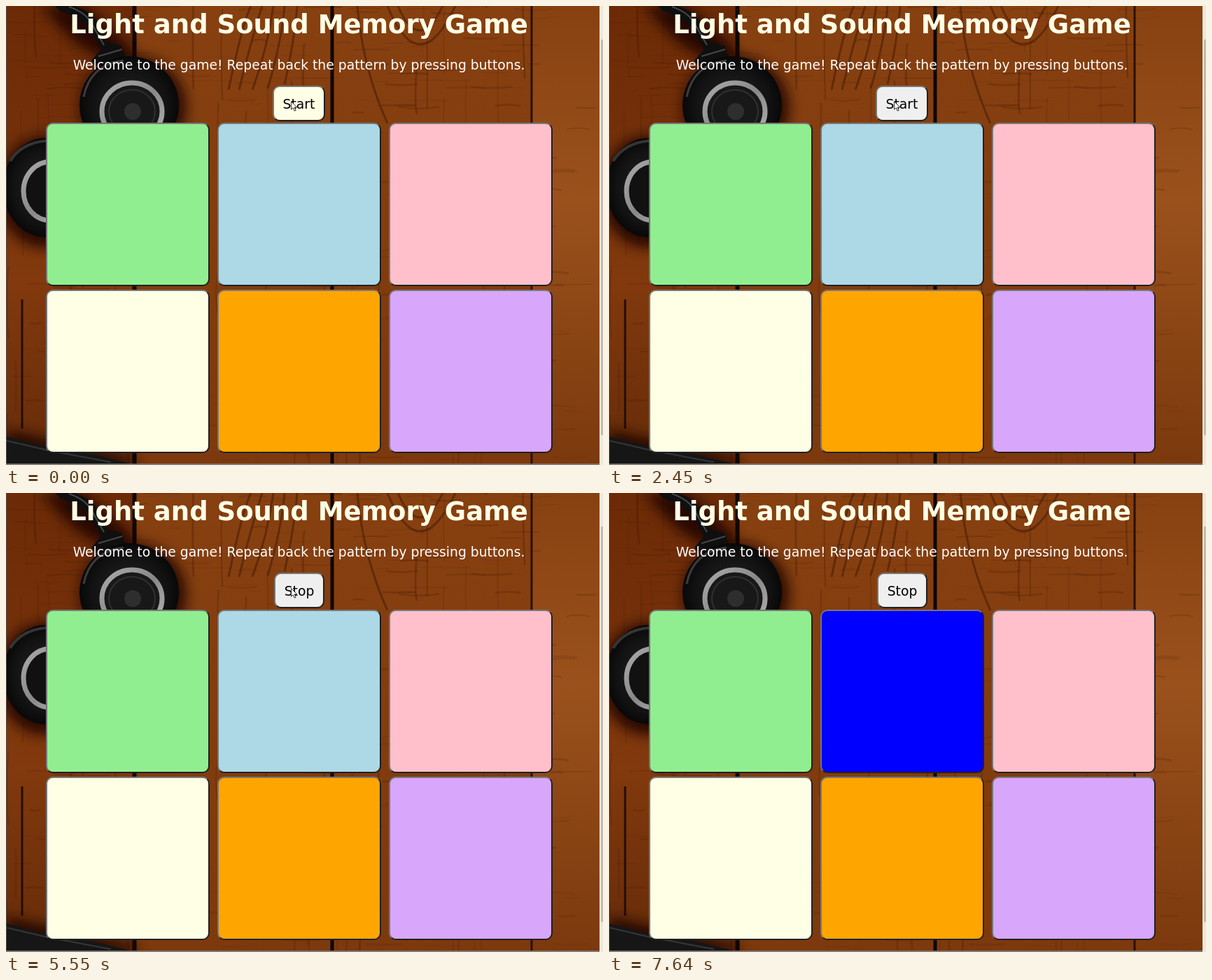
These frames come from a looping animation (853x657 px, 8000 ms). An HTML page:

```html
<!DOCTYPE html>
<html lang="en">
<head>
<meta charset="utf-8">
<title>Light and Sound Memory Game</title>
<style>
  :root {
    --cream: #ffffe6;
    --out: #767676 #212121 #212121 #767676;
    --in: #212121 #767676 #767676 #212121;
  }
  html, body { margin: 0; width: 100%; height: 100%; overflow: hidden; }
  body { position: relative; background: #84400f; font: 18.75px "DejaVu Sans", Verdana, sans-serif; }
  body > * { position: absolute; box-sizing: border-box; }
  .wood { left: 0; top: 0; }
  h1, p { left: 0; width: 837px; margin: 0; text-align: center; white-space: nowrap; }
  h1 { top: 3px; font-size: 37px; line-height: 48px; color: var(--cream); }
  p { top: 73px; line-height: 24px; color: #fff; }

  .tile, .button { border: 2px solid; border-color: var(--out); border-radius: 10px; }
  .tile { width: 234px; height: 234px; left: var(--x); top: var(--y); background: var(--c); }
  .button { top: 114px; height: 51px; padding-top: 1px; line-height: 47px; text-align: center; color: #000; background: #efefef; }
  .start { left: 381px; width: 75px; }
  .stop { left: 383px; width: 72px; }
  .cursor { left: 0; top: 0; overflow: visible; }

  /* One 8 s loop, hard changes only: 1% = 80 ms */
  .lit, .button, .cursor { animation: 8s step-end infinite; }
  .lit { animation-name: light, tap; }
  .start { animation-name: start, press, tint; }
  .stop { animation-name: stop, press; }
  .arrow { animation-name: arrow; }
  .beam { animation-name: beam; }

  @keyframes light {
    0%, 30.625%, 69.375%, 81.75% { background: #add8e6; }
    17%, 57.75%, 80.25%, 95.5%, 100% { background: #00f; }
  }
  @keyframes tap {
    0%, 81.75%, 100% { border-color: var(--out); }
    80.25% { border-color: var(--in); }
  }
  @keyframes press {
    0%, 5%, 27.5%, 45.75%, 100% { border-color: var(--out); }
    3.5%, 23.75%, 42.625% { border-color: var(--in); }
  }
  @keyframes tint {
    0% { background: var(--cream); }
    5%, 100% { background: #efefef; }
  }
  @keyframes start {
    0%, 27.5% { opacity: 1; }
    5%, 45.75%, 100% { opacity: 0; }
  }
  @keyframes stop {
    0%, 27.5% { opacity: 0; }
    5%, 45.75%, 100% { opacity: 1; }
  }
  @keyframes arrow {
    0% { transform: translate(407px, 136px); opacity: 1; }
    75.625% { transform: translate(421px, 184px); opacity: 1; }
    77.125% { transform: translate(432px, 225px); opacity: 1; }
    85.625% { transform: translate(411px, 184px); opacity: 1; }
    87.125% { transform: translate(362px, 116px); opacity: 1; }
    88.625%, 100% { transform: translate(327px, 73px); opacity: 0; }
  }
  @keyframes beam {
    0% { transform: translate(327px, 73px); opacity: 0; }
    88.625% { transform: translate(327px, 73px); opacity: 1; }
    90.5%, 100% { transform: translate(328px, 73px); opacity: 1; }
  }
</style>
</head>
<body>
<svg class="wood" width="853" height="657">
  <defs>
    <linearGradient id="left" x2="0" y2="1">
      <stop stop-color="#6c2a06"/><stop offset=".3" stop-color="#74300a"/>
      <stop offset=".6" stop-color="#82390d"/><stop offset="1" stop-color="#652c09"/>
    </linearGradient>
    <linearGradient id="mid" x2="0" y2="1">
      <stop stop-color="#874010"/><stop offset="1" stop-color="#7d390d"/>
    </linearGradient>
    <linearGradient id="right" x2="0" y2="1">
      <stop stop-color="#874111"/><stop offset=".42" stop-color="#9a511c"/><stop offset="1" stop-color="#7b390d"/>
    </linearGradient>
    <radialGradient id="cup">
      <stop stop-color="#252525"/><stop offset=".75" stop-color="#121212"/><stop offset="1" stop-color="#080808"/>
    </radialGradient>
    <linearGradient id="ring" x2="1" y2="1">
      <stop stop-color="#aaa"/><stop offset=".5" stop-color="#888"/><stop offset="1" stop-color="#b4b4b4"/>
    </linearGradient>
    <filter id="soft" x="-50%" y="-50%" width="200%" height="200%"><feGaussianBlur stdDeviation="9"/></filter>
  </defs>

  <rect width="186" height="657" fill="url(#left)"/>
  <rect x="186" width="280" height="657" fill="url(#mid)"/>
  <rect x="466" width="286" height="657" fill="url(#mid)"/>
  <rect x="752" width="97" height="657" fill="url(#right)"/>
  <g id="grain" fill="none" stroke="#3b1703"/>
  <g fill="none" stroke="#4a1e05" stroke-width="3" opacity=".6">
    <path d="M318 120Q338 24 350 0M333 120Q350 50 366 0M352 120Q374 60 382 0M374 118Q394 50 398 0M398 112Q412 50 416 0"/>
    <path d="M560 0Q590 70 624 0M545 0Q590 110 642 0M502 0Q510 90 545 168"/>
  </g>
  <path d="M23 420V605" stroke="#240d02" stroke-width="3"/>
  <path d="M183.5 0V657" stroke="#120804" stroke-width="6"/>
  <path d="M466 0V657" stroke="#0d0603" stroke-width="5"/>
  <path d="M751 0V657" stroke="#2a1005" stroke-width="3"/>

  <g fill="#150601" opacity=".8" filter="url(#soft)">
    <ellipse cx="182" cy="145" rx="76" ry="74"/>
    <ellipse cx="54" cy="266" rx="66" ry="80"/>
    <path d="M50 0H114L184 64L150 84L96 50Z"/>
    <path d="M0 606L190 650V657H0Z"/>
  </g>
  <path d="M70 0H98Q124 8 131 26L144 52L165 57L172 76L128 86L122 78L136 62L120 34Q108 18 78 8Z" fill="#0f0f0f"/>
  <path d="M90 1Q116 10 124 28L140 56M132 72L166 62" fill="none" stroke="#464646" stroke-width="2"/>

  <ellipse cx="176" cy="142" rx="71" ry="70" fill="url(#cup)"/>
  <path d="M111 130Q120 84 168 78" fill="none" stroke="#3c3c3c" stroke-width="3"/>
  <ellipse cx="180" cy="151" rx="43" ry="41" fill="#181818" stroke="url(#ring)" stroke-width="7"/>
  <ellipse cx="180" cy="151" rx="33" ry="31" fill="none" stroke="#303030" stroke-width="2"/>
  <circle cx="181" cy="151" r="12" fill="#2e2e2e"/>

  <ellipse cx="56" cy="260" rx="60" ry="71" fill="url(#cup)"/>
  <path d="M6 222Q22 196 57 193" fill="none" stroke="#353535" stroke-width="4"/>
  <ellipse cx="63" cy="265" rx="38" ry="42" fill="#111" stroke="url(#ring)" stroke-width="7"/>

  <path d="M0 616L58 631L125 642L186 657H0Z" fill="#161616"/>
  <path d="M0 622L60 636L150 653" fill="none" stroke="#363636" stroke-width="2"/>

  <path d="M.5 0V657" stroke="#514b47"/>
  <path d="M0 656H849" stroke="#817a76" stroke-width="2"/>
  <rect x="848" width="5" height="657" fill="#eee8dc"/>
  <rect x="850" y="48" width="3" height="566" fill="#c4bcb2"/>
</svg>

<h1>Light and Sound Memory Game</h1>
<p>Welcome to the game! Repeat back the pattern by pressing buttons.</p>
<div class="button start">Start</div>
<div class="button stop">Stop</div>

<div class="tile" style="--x:57px;--y:167px;--c:#90ee90"></div>
<div class="tile lit" style="--x:302px;--y:167px;--c:#add8e6"></div>
<div class="tile" style="--x:547px;--y:167px;--c:#ffc0cb"></div>
<div class="tile" style="--x:57px;--y:406px;--c:#ffffe6"></div>
<div class="tile" style="--x:302px;--y:406px;--c:#ffa500"></div>
<div class="tile" style="--x:547px;--y:406px;--c:#d8a6fb"></div>

<svg class="cursor arrow" width="10" height="16">
  <path d="M.5 .7V12.2L3.2 9.7L5.2 14.2L7.1 13.3L5.2 9H8.8Z" fill="#fff" stroke="#000" stroke-width=".8"/>
</svg>
<svg class="cursor beam" width="8" height="14">
  <path d="M.5 .5H3L4 1.5L5 .5H7.5M4 1.5V12M.5 13H3L4 12L5 13H7.5" fill="none" stroke="#34251c"/>
</svg>

<script>
  // Faint wood grain: upright streaks on the wide planks, level ones everywhere.
  let seed = 7;
  const rand = (lo, hi) => {
    seed = (seed * 16807) % 2147483647;
    return lo + (hi - lo) * seed / 2147483647;
  };
  const grain = document.getElementById("grain");
  function streak(d, opacity) {
    const path = document.createElementNS("http://www.w3.org/2000/svg", "path");
    path.setAttribute("d", d);
    path.setAttribute("stroke-width", rand(1, 3));
    path.setAttribute("opacity", opacity);
    grain.append(path);
  }
  for (let i = 0; i < 90; i++) {
    streak(`M${rand(2, 745)} ${rand(-60, 640)}q${rand(-6, 6)} ${rand(20, 60)} 0 ${rand(60, 150)}`, rand(.08, .35));
  }
  for (let i = 0; i < 320; i++) {
    const w = rand(15, 60);
    streak(`M${rand(0, 846 - w)} ${rand(0, 655)}q${w / 2} ${rand(-5, 5)} ${w} 0`, rand(.05, .22));
  }
</script>
</body>
</html>
```
